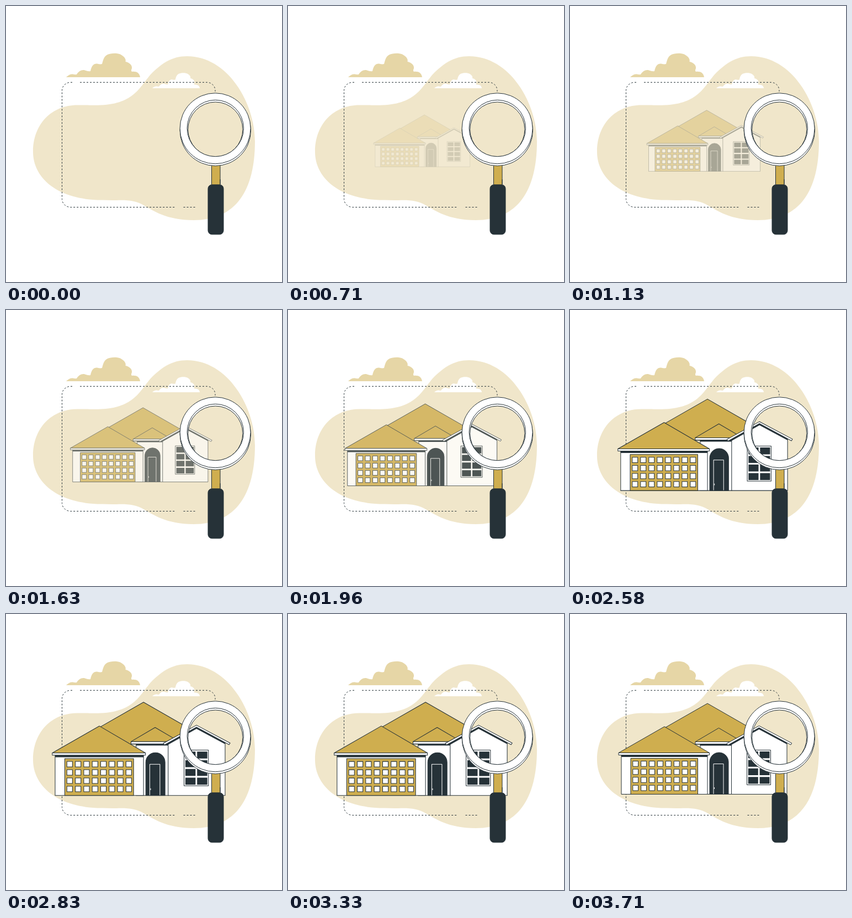
Animation of 500x500 px, one loop 3.75 s. Source, as an HTML page:

```html
<!DOCTYPE html>
<html lang="en">
<head>
<meta charset="utf-8">
<title>House search</title>
<style>
  html, body { margin: 0; width: 100%; height: 100%; overflow: hidden; background: #fff; }
  svg { display: block; width: 100%; height: 100%; }
  .gold { fill: #cfae4f; }
  .dark { fill: #263238; }
  .white { fill: #fff; }
  .line { stroke: #263238; stroke-width: 1; stroke-linejoin: round; }
  .hollow { fill: none; }
</style>
</head>
<body>
<svg viewBox="0 0 500 500">
  <defs>
    <path id="cloud" d="M109 129C113 125 117 123 121 123.5Q125 124.5 128 124C132 118 137 115 143 116.5Q149 119 153 118C155 108 159 104 165 104.5Q171 106 174 105C176 98 177 92 183 88.500C190 85 201 85 207 87.500C214 91 218 96 216.500 101C223 102 229 107 228 113Q226 117 228 119C236 118 242 121 243 129Z"/>
  </defs>

  <path fill="#f0e6ca" d="M49 264C49 213 84 179 130 179.500C152 179.500 160 180 172 179.500C232 177 243 146 262 124C282 104 300 91 328 91C402 91 451 176 451 245C451 335 416 388 340 388C290 388 266 370 251 362C235 352 220 351.500 200 352C190 352 178 351.500 165 351.500C90 348 49 310 49 264Z"/>
  <use href="#cloud" fill="#e6d6a6"/>
  <use href="#cloud" class="white" transform="translate(265 149) scale(.642) translate(-109 -129)"/>
  <path class="line hollow" stroke-dasharray="3 3" d="M120 138.300h-3a15.500 15 0 0 0-15.500 15V349.500a15.500 15 0 0 0 15.500 15H306M321.500 364.500H344M134 138.300H364a15 15 0 0 1 15 15v4"/>

  <g id="house" class="line" opacity="0">
    <path class="gold" d="M249 162L331 209L292 236H130V230Z"/>
    <!-- entrance -->
    <path class="white" d="M236 235H293V326.500H236Z"/>
    <path class="dark" stroke="none" d="M236 235.500H293V238.500H236Z"/>
    <path class="gold" d="M269.500 206.500L312 231.500H227Z"/>
    <path class="white" d="M227 231.500H300V235.500H227Z"/>
    <path class="dark" d="M253 326.500V268a17 17 0 0 1 34 0V326.500Z"/>
    <path class="hollow" stroke="#fff" d="M260 326V271.500H278V326"/>
    <path class="hollow" stroke="#fff" d="M261.500 314v3"/>
    <!-- garage -->
    <path class="white" d="M93 255H249V326.500H93Z"/>
    <path class="dark" stroke="none" d="M93 255.500H249V259H93Z"/>
    <path class="gold" d="M171 204L252.500 251.500H88Z"/>
    <path class="white" d="M88 251.500H252.500V255.500H88Z"/>
    <path class="gold" d="M110 261.500H231.500V326.500H110Z"/>
    <g id="garagePanes" class="white"></g>
    <!-- right wing -->
    <path class="white" d="M292.500 326.500V233L342.500 206L393 233V326.500Z"/>
    <path class="dark" stroke="none" d="M286 237L342.500 205L393 232.500V236L342.500 209L292.500 237Z"/>
    <path class="white" d="M342.500 202.500L401.800 234L400 237L342.500 206L286 237.500L284 234.500Z"/>
    <path class="white" d="M320.500 246.500H363.500V309.500H320.500Z"/>
    <g id="wingPanes" class="dark" stroke="none"></g>
  </g>

  <!-- magnifier -->
  <g class="line">
    <rect class="gold" x="372.500" y="287.500" width="15.500" height="38" rx="2"/>
    <path class="hollow" d="M372.500 314V323M388 314V323"/>
    <rect class="dark" x="366" y="323.800" width="28" height="90" rx="7"/>
    <path id="rimBack" class="white" fill-rule="evenodd"/>
    <path id="rimFront" class="white" fill-rule="evenodd"/>
  </g>
</svg>
<script>
  const LOOP = 3750, LEAD = 40;
  const CENTER = [244.7, 244.2];
  const byId = id => document.getElementById(id);

  function addPanes(id, cols, rows, x, y, dx, dy, w, h) {
    let d = '';
    for (let r = 0; r < rows; r++)
      for (let c = 0; c < cols; c++)
        d += `M${x + c * dx} ${y + r * dy}h${w}v${h}h${-w}z`;
    byId(id).innerHTML = `<path d="${d}"/>`;
  }

  const circle = (x, y, r) =>
    `M${x - r} ${y}a${r} ${r} 0 1 1 ${2 * r} 0a${r} ${r} 0 1 1 ${-2 * r} 0z`;

  addPanes('garagePanes', 8, 4, 113.8, 266.5, 14.9, 14.6, 9.8, 9.7);
  addPanes('wingPanes', 2, 4, 322.8, 249, 20.8, 15.4, 18, 12.3);
  byId('rimBack').setAttribute('d', circle(379.3, 225.3, 64.2) + circle(379.3, 223.6, 49.6));
  byId('rimFront').setAttribute('d', circle(379.1, 221.8, 64) + circle(379.3, 221.5, 51.2));

  const bezier = (a, b, u) => 3 * (1 - u) ** 2 * u * a + 3 * (1 - u) * u * u * b + u ** 3;

  // Easing with a small overshoot, solved by bisection.
  function ease(x) {
    let lo = 0, hi = 1;
    for (let i = 0; i < 30; i++) {
      const mid = (lo + hi) / 2;
      if (bezier(0.36, 0.5, mid) < x) lo = mid; else hi = mid;
    }
    return bezier(-0.01, 1.38, lo);
  }

  function render(time) {
    const p = ease(Math.min(1, (time % LOOP + LEAD) / LOOP));
    const [x, y] = CENTER;
    const house = byId('house');
    house.setAttribute('opacity', Math.max(0, Math.min(1, p)));
    house.setAttribute('transform',
      `translate(${x} ${y}) scale(${0.5 + p / 2}) translate(${-x} ${-y})`);
  }

  function tick() {
    render(performance.now());
    requestAnimationFrame(tick);
  }
  tick();
</script>
</body>
</html>
```
